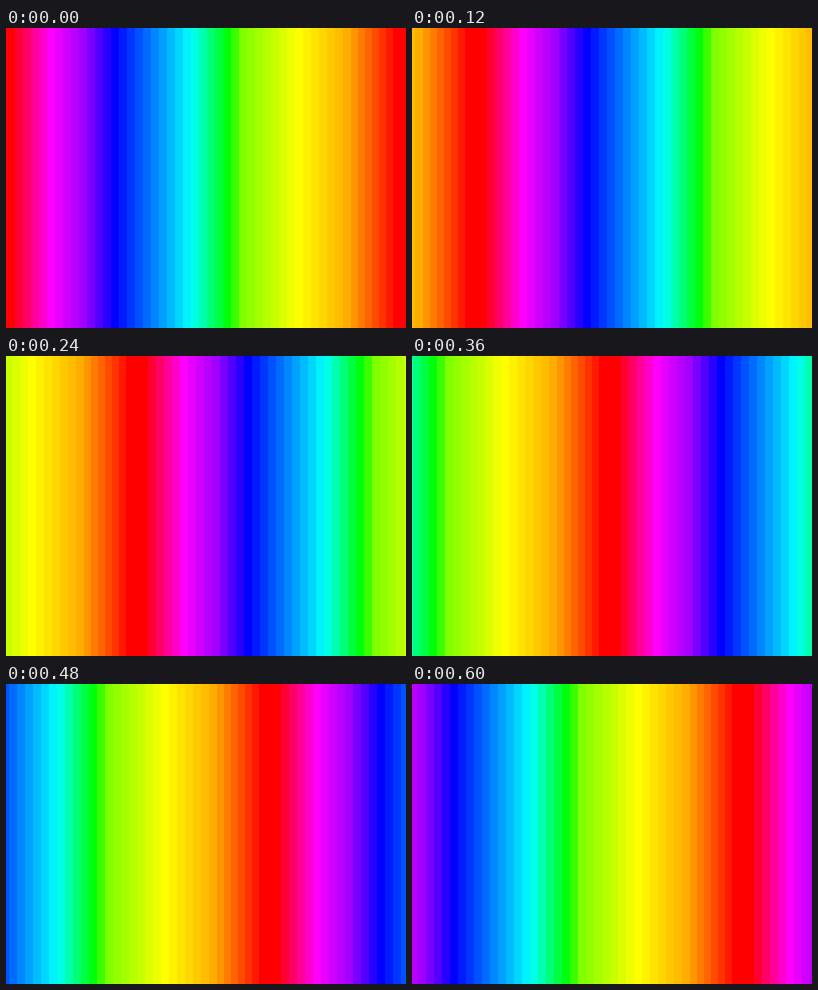
Write an HTML page with a canvas that moves like this. It is 400 px wide and 300 px high and loops after 660 ms.

```html
<!DOCTYPE html>
<html lang="en">
<head>
<meta charset="utf-8">
<title>Rainbow stripes</title>
<style>
html, body { margin: 0; width: 100%; height: 100%; overflow: hidden; }
canvas { display: block; width: 100%; height: 100%; }
</style>
</head>
<body>
<canvas id="stage" width="400" height="300"></canvas>
<script>
const ctx = document.getElementById('stage').getContext('2d');
const W = 400, H = 300, STEP_MS = 60, STEPS = 11, SHIFT = W / 12;
const COUNT = 48, WIDE = 42;

// Stripe number and the hue reached there
const hues = [
  [0, 360], [5, 300], [9, 278], [13, 240], [22.5, 180],
  [27.2, 120], [29, 90], [36, 60], [42, 41], [49, 0]
];

function hueAt(n) {
  const i = hues.findIndex(([at]) => at > n);
  const [a, from] = hues[i - 1], [b, to] = hues[i];
  return from + (to - from) * (n - a) / (b - a);
}

// Left edge: wide stripes of 8, then narrower orange ones of 7
const edge = n => 1 + 8 * n - Math.max(0, n - WIDE - 1);

function draw(now) {
  const step = Math.floor(now / STEP_MS) % STEPS;
  const shift = Math.floor(step * SHIFT);
  ctx.fillStyle = '#f00';
  ctx.fillRect(0, 0, W, H);
  for (let n = 1; n <= COUNT; n++) {
    const x = edge(n) + shift, w = edge(n + 1) - edge(n);
    ctx.fillStyle = `hsl(${hueAt(n)} 100% 50%)`;
    ctx.fillRect(x, 0, w, H);
    ctx.fillRect(x - W, 0, w, H);
  }
}

const start = performance.now();
function tick() {
  draw(performance.now() - start);
  requestAnimationFrame(tick);
}
tick();
</script>
</body>
</html>
```
